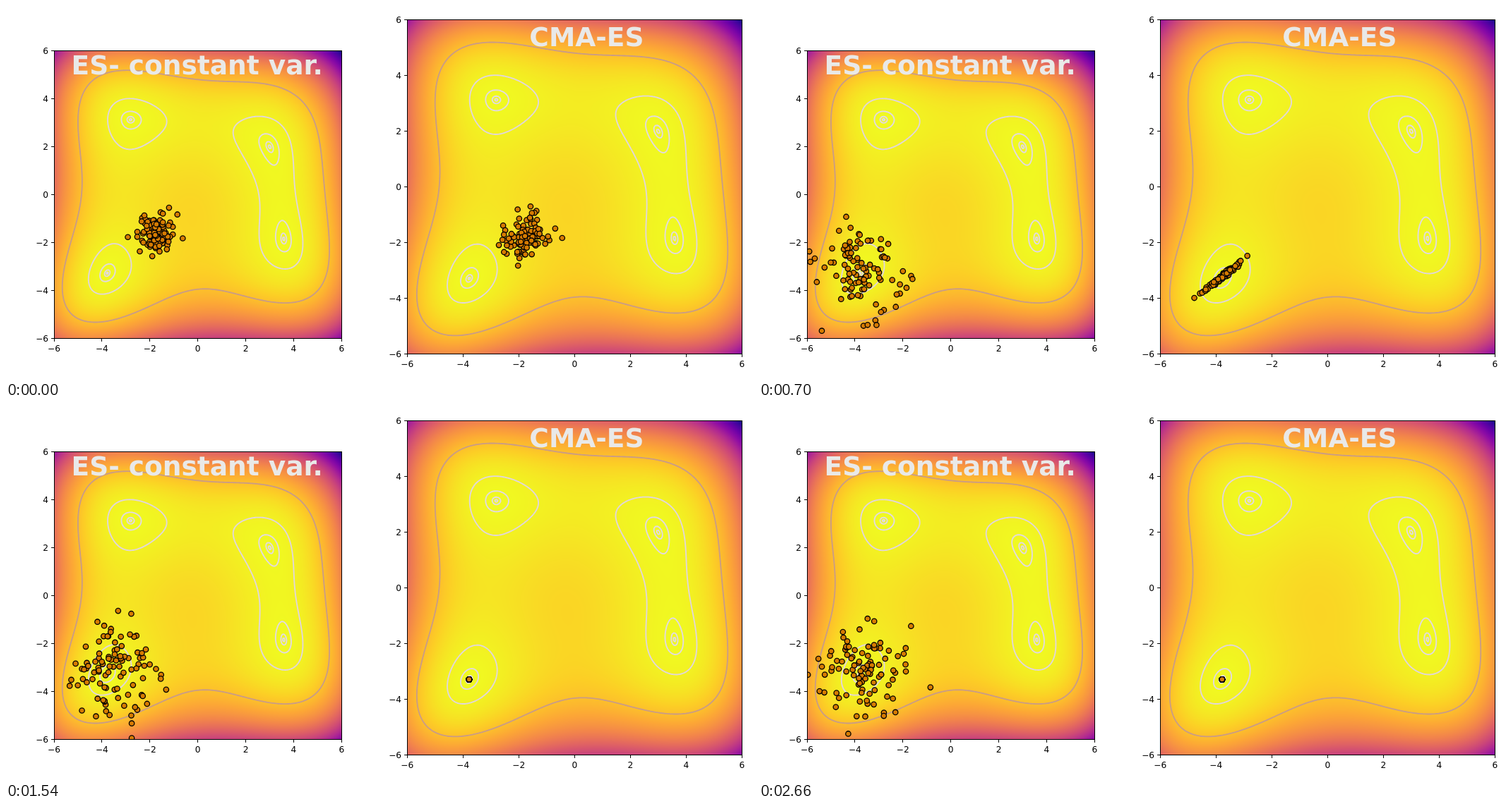
Recreate the animation shown at these times as an HTML page with a canvas. Size 1058x529 px, loop 2.8 s.

```html
<!DOCTYPE html>
<html lang="en">
<head>
<meta charset="utf-8">
<title>Evolution strategies</title>
<style>
html, body { margin: 0; width: 100%; height: 100%; overflow: hidden; background: #fff; }
canvas, svg { position: absolute; left: 0; top: 0; display: block; }
text { font-family: "DejaVu Sans", sans-serif; font-size: 12.2px; }
.title { font-size: 37.5px; font-weight: bold; fill: #e9e9e8; text-anchor: middle; }
.line { fill: none; stroke-width: 1.85; stroke-linecap: round; }
.axis { fill: none; stroke: #000; stroke-width: 1; }
.dot { fill: #d67b02; stroke: #000; stroke-width: 1.3; }
</style>
</head>
<body>
<canvas id="field" width="1058" height="529"></canvas>
<svg id="stage" width="1058" height="529" viewBox="0 0 1058 529"></svg>
<script>
const STEP = 140, STEPS = 20, COUNT = 100, GRID = 240;
const stage = document.getElementById('stage');
const ctx = document.getElementById('field').getContext('2d');

// Plasma colour map, dark to light
const plasma = ['0d0887', '41049d', '6a00a8', '8f0da4', 'b12a90', 'cc4778',
  'e16462', 'f2844b', 'fca636', 'fcce25', 'f0f921']
  .map(h => [0, 2, 4].map(i => parseInt(h.slice(i, i + 2), 16)));

const himmelblau = (x, y) => (x * x + y - 11) ** 2 + (x + y * y - 7) ** 2;
const PEAK = himmelblau(6, 6);
const snap = v => Math.floor(v) + 0.5;

function el(tag, attrs, parent = stage) {
  const node = document.createElementNS('http://www.w3.org/2000/svg', tag);
  for (const k in attrs) node.setAttribute(k, attrs[k]);
  return parent.appendChild(node);
}

// Maps data units (-6 to 6) to pixels
function makeBox(x, y, size) {
  const unit = size / 12, x0 = snap(x), y0 = snap(y);
  return {
    x0, y0, w: snap(x + size) - x0, h: snap(y + size) - y0,
    px: v => x + (v + 6) * unit, py: v => y + (6 - v) * unit
  };
}

function makeField({ w, h }) {
  const img = ctx.createImageData(w + 1, h + 1);
  for (let j = 0, k = 0; j <= h; j++) {
    for (let i = 0; i <= w; i++, k += 4) {
      const f = himmelblau(12 * i / w - 6, 6 - 12 * j / h);
      const v = 10 * (1 - f / PEAK), lo = Math.max(0, Math.min(9, Math.floor(v)));
      for (let c = 0; c < 3; c++) {
        img.data[k + c] = plasma[lo][c] + (plasma[lo + 1][c] - plasma[lo][c]) * (v - lo);
      }
      img.data[k + 3] = 255;
    }
  }
  return img;
}

// Marching squares: pairs of points in data units
function contour(level) {
  const at = i => 12 * i / GRID - 6, segs = [];
  for (let j = 0; j < GRID; j++) {
    for (let i = 0; i < GRID; i++) {
      const c = [[i, j], [i + 1, j], [i + 1, j + 1], [i, j + 1]].map(([a, b]) => [at(a), at(b)]);
      const f = c.map(p => himmelblau(p[0], p[1]) - level);
      const hits = [];
      for (let a = 0; a < 4; a++) {
        const b = (a + 1) % 4;
        if (f[a] < 0 === f[b] < 0) continue;
        const u = f[a] / (f[a] - f[b]);
        hits.push([c[a][0] + u * (c[b][0] - c[a][0]), c[a][1] + u * (c[b][1] - c[a][1])]);
      }
      for (let h = 0; h + 1 < hits.length; h += 2) segs.push([hits[h], hits[h + 1]]);
    }
  }
  return segs;
}
const contours = ['#e2d9e2', '#e2d9e2', '#e2d9e1', '#e1d6dc', '#ca9c85']
  .map((stroke, k) => ({ stroke, segs: contour(0.1 * Math.exp(2 * k)) }));

function makePanel(box) {
  const back = el('g', {}), front = el('g', {});
  const { x0, y0, w, h, px, py } = box, bottom = y0 + h;
  const pt = p => px(p[0]).toFixed(2) + ' ' + py(p[1]).toFixed(2);
  for (const { stroke, segs } of contours) {
    el('path', { class: 'line', stroke, d: segs.map(s => 'M' + pt(s[0]) + 'L' + pt(s[1])).join('') }, back);
  }
  el('rect', { class: 'axis', x: x0, y: y0, width: w, height: h }, front);
  for (let v = -6; v <= 6; v += 2) {
    el('path', { class: 'axis', d: `M${snap(px(v))} ${bottom}v4.4M${x0} ${snap(py(v))}h-4.4` }, front);
    const label = String(v).replace('-', '\u2212');
    el('text', { x: px(v), y: Math.round(bottom + 18), 'text-anchor': 'middle' }, front).textContent = label;
    el('text', { x: x0 - 8.4, y: Math.round(py(v) + 4.4), 'text-anchor': 'end' }, front).textContent = label;
  }
  return { box, back, front, img: makeField(box) };
}

function makeDots(attrs) {
  const g = el('g', attrs);
  return Array.from({ length: COUNT }, () => el('circle', { class: 'dot', r: 3.7 }, g));
}

function makeRandom(seed) {
  return () => {
    seed = (seed + 0x6D2B79F5) | 0;
    let t = Math.imul(seed ^ (seed >>> 15), 1 | seed);
    t = (t + Math.imul(t ^ (t >>> 7), 61 | t)) ^ t;
    return ((t ^ (t >>> 14)) >>> 0) / 4294967296;
  };
}

// Gaussian cloud around a mean, stretched along an angle
function cloud(seed, mx, my, major, minor, angle) {
  const rnd = makeRandom(seed), c = Math.cos(angle), s = Math.sin(angle);
  return Array.from({ length: COUNT }, () => {
    const r = Math.sqrt(-2 * Math.log(1 - rnd())), a = 2 * Math.PI * rnd();
    const u = major * r * Math.cos(a), v = minor * r * Math.sin(a);
    return [mx + u * c - v * s, my + u * s + v * c];
  });
}

const settle = (from, to, n, rate) => to + (from - to) * Math.exp(-((rate * n) ** 1.5));

function fixedCloud(n) {
  const spread = 0.96 - 0.57 * Math.exp(-n);
  return cloud(100 + n, settle(-1.75, -3.72, n, 0.8), settle(-1.68, -3.2, n, 0.8), spread, spread, 0);
}

// Stretches along the valley, then collapses on the minimum
function adaptedCloud(n) {
  const major = 0.42 * Math.exp(0.837 * n - 0.167 * n * n);
  const minor = 0.36 * Math.exp(-0.46 * n);
  return cloud(500 + n, settle(-1.75, -3.78, n, 0.5), settle(-1.75, -3.28, n, 0.41),
    major, Math.min(major, minor), 0.67);
}

const left = makePanel(makeBox(68, 63.8, 407.4));
const wide = makePanel(makeBox(568.2, 19.6, 474.2));
const narrow = makePanel(makeBox(569.3, 28.1, 471.8));
const clip = el('clipPath', { id: 'leftClip' });
el('rect', { x: left.box.x0, y: left.box.y0, width: left.box.w, height: left.box.h }, clip);
const leftDots = makeDots({ 'clip-path': 'url(#leftClip)' }), rightDots = makeDots({});
[left, wide, narrow].forEach(p => stage.appendChild(p.front));
el('text', { class: 'title', x: 270.7, y: 97 }).textContent = 'ES- constant var.';
el('text', { class: 'title', x: 822.4, y: 57 }).textContent = 'CMA-ES';

function place(dots, points, { px, py }) {
  points.forEach(([x, y], i) => {
    dots[i].setAttribute('cx', px(x).toFixed(2));
    dots[i].setAttribute('cy', py(y).toFixed(2));
  });
}

function show(panel, on) {
  panel.back.style.display = panel.front.style.display = on ? '' : 'none';
}

function draw(n) {
  const right = n >= 1 && n <= 3 ? narrow : wide;
  show(wide, right === wide);
  show(narrow, right === narrow);
  ctx.clearRect(0, 0, 1058, 529);
  for (const { img, box } of [left, right]) ctx.putImageData(img, Math.floor(box.x0), Math.floor(box.y0));
  place(leftDots, fixedCloud(n), left.box);
  place(rightDots, adaptedCloud(n), right.box);
}

let shown = -1;
const start = performance.now();
function tick() {
  const n = Math.floor((performance.now() - start) / STEP) % STEPS;
  if (n !== shown) draw(shown = n);
  requestAnimationFrame(tick);
}
tick();
</script>
</body>
</html>
```
